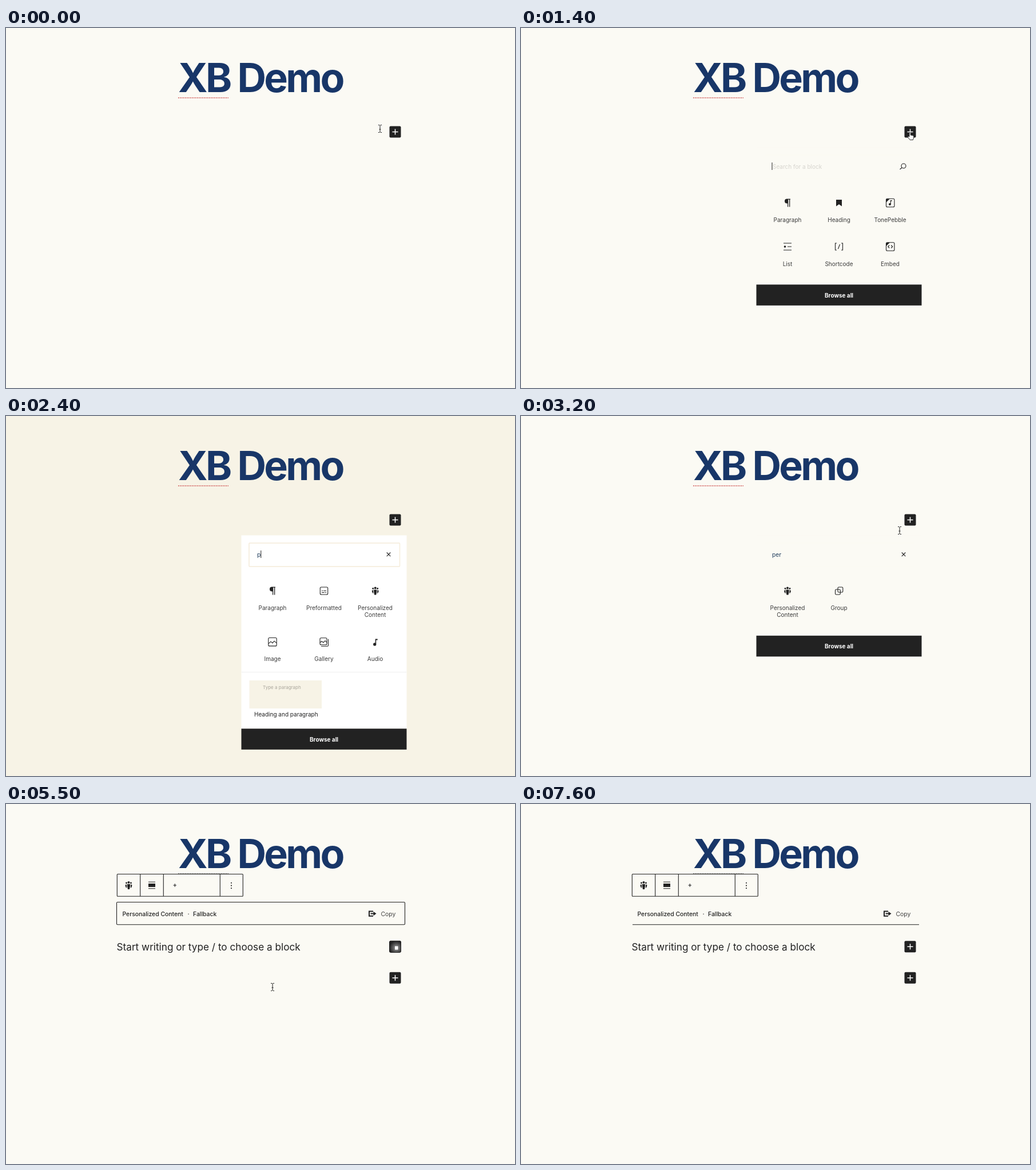
Animation, 890 px wide and 629 px high, one loop 7700 ms. Source, as an HTML page:

```html
<!DOCTYPE html>
<html lang="en">
<head>
<meta charset="utf-8">
<title>Block editor demo</title>
<style>
html, body { margin: 0; width: 100%; height: 100%; overflow: hidden; background: #fbfaf4; }
svg { display: block; width: 890px; height: 629px; background: var(--page);
  --page: #fbfaf4; --panel: #fbfaf4; --edge: #fbfaf4; --rule: #fbfaf4; }
svg.warm { --page: #f7f3e6; --panel: #fff; --edge: #f5ecd9; --rule: #eee; }
text { font: 10px Inter, sans-serif; font-optical-sizing: none; fill: #222; }
.title { font-size: 70px; font-weight: 700; letter-spacing: -.053em; fill: #183668; }
.labels text { text-anchor: middle; fill: #3c3c3c; }
.bar { fill: #222; }
.bar text { font-weight: 700; fill: #fff; text-anchor: middle; }
.query { font-size: 10.3px; fill: #24405f; }
.block { font-size: 10.4px; font-weight: 500; }
.line { fill: none; stroke: #222; stroke-width: 1.1; }
.hover text { fill: #c6c9ef; }
</style>
</head>
<body>
<svg viewBox="0 0 890 629">
  <defs>
    <g id="plus"><rect x="-10" y="-10" width="20" height="20" rx="2" fill="#222"/><path d="M-5 0H5M0-5V5" stroke="#fff" stroke-width="1.5"/></g>
    <path id="paragraph" d="M5-7H-1A4 4 0 0 0-1 1H0V7H1.3V-5.7H3V7H4.3V-5.7H5Z" fill="#222"/>
    <path id="heading" d="M-5-5.5H5V6L0 2.5-5 6Z" fill="#222"/>
    <g id="frame"><rect class="line" x="-7.2" y="-7.2" width="14.4" height="14.4" rx="2"/><path d="M-7-7H-1L-7-1Z" fill="#222"/></g>
    <g id="note"><path d="M0 3V-6H4V-4H1.5V3" fill="#222"/><circle cx="-1" cy="3.4" r="2.6" fill="#222"/></g>
    <g id="music"><use href="#frame"/><use href="#note" transform="scale(.75)"/></g>
    <g id="embed"><use href="#frame"/><path class="line" d="M-1.5-2.5-4 0-1.5 2.5M1.5-2.5 4 0 1.5 2.5"/></g>
    <g id="list"><path class="line" d="M-7-6H7M0 0H7M-7 6H7"/><circle cx="-4.5" r="1.8" fill="#222"/></g>
    <path id="shortcode" class="line" d="M-4-6H-6.5V6H-4M4-6H6.5V6H4M1.5-4-1.5 4"/>
    <g id="preformatted"><rect class="line" x="-6.7" y="-6.5" width="13.4" height="13" rx="2"/><path class="line" d="M-4 0H-2M-1 0H4M-4 3H1M2 3H4"/></g>
    <g id="people" fill="#222"><circle cy="-5" r="2"/><circle cx="-4" cy="-4" r="1.4"/><circle cx="4" cy="-4" r="1.4"/><path d="M-2.5-2H2.5V2L1.5 7H-1.5L-2.5 2ZM-3.5-1.5V5Q-6 3-6-.5ZM3.5-1.5V5Q6 3 6-.5Z"/></g>
    <g id="image"><rect class="line" x="-7.2" y="-7.2" width="14.4" height="14.4" rx="2"/><path class="line" d="M-7 3-3-.5 0 2 3-1.5 7 2"/></g>
    <g id="gallery"><rect class="line" x="-7" y="-7" width="12" height="12" rx="2"/><path class="line" d="M-7 1-4-1-1 1 2-2 5 1M7.5-5V6Q7.5 7.5 6 7.5H-5"/></g>
    <g id="group"><rect class="line" x="-2" y="-6.5" width="8.8" height="9" rx="1.8"/><rect class="line" x="-6.5" y="-2.5" width="8.8" height="9" rx="1.8"/></g>
    <path id="close" class="line" d="M-3.3-3.3 3.3 3.3M3.3-3.3-3.3 3.3"/>
    <path id="beam" d="M-3-6.5H-1L0-5.5 1-6.5H3M0-5.5V5.5M-3 6.5H-1L0 5.5 1 6.5H3M-1.5 1H1.5" fill="none" stroke="#222"/>
    <path id="arrow" d="M0 0V12L3 9.5 5 14 7 13 5 9H9Z" fill="#222" stroke="#fff"/>
    <path id="hand" d="M-2-5Q-.5-6.5.2-4.5V-1L5 0Q6 .5 5.7 2.5L4.5 7.5H-1L-5 2Q-5 0-2 2Z" fill="#fff" stroke="#222" stroke-width=".9"/>
    <radialGradient id="smudge" cx=".6" cy=".6" r=".6"><stop stop-color="#999"/><stop offset="1" stop-color="#222"/></radialGradient>
  </defs>

  <path data-at="3500-5500" d="M195 161.5H695" stroke="#ecf0ec" stroke-width="2"/>
  <text class="title" x="301" y="111.5">XB Demo</text>
  <path data-at="0-5500" d="M301 122H389" stroke="#c44" stroke-width="1.6" stroke-dasharray="1.6 1.4"/>
  <path data-at="5500-7700" d="M301 121.7H389" stroke="#333" stroke-width=".9" stroke-dasharray="1.6 1.4"/>
  <use data-at="0-5500" href="#plus" x="680.5" y="181.5"/>

  <g id="popover" data-at="800-5500">
    <rect id="panel" x="411.5" y="208.5" width="289" fill="var(--panel)"/>
    <rect x="425" y="222" width="263.5" height="41" rx="1" fill="none" stroke="var(--edge)" stroke-width="1.5"/>

    <g data-at="800-2000">
      <text x="440" y="246" style="fill:#d6d4ce">Search for a block</text>
      <path d="M439 235V248" stroke="#222"/>
      <path class="line" d="M666 244 662.5 247" stroke-width="1.6"/><circle class="line" cx="669" cy="241" r="4"/>
      <use href="#paragraph" x="466" y="305.5"/><use href="#heading" x="556" y="305.5"/><use href="#music" x="645.7" y="305.5"/>
      <use href="#list" x="466" y="382"/><use href="#shortcode" x="556" y="382"/><use href="#embed" x="645.7" y="382"/>
      <g class="labels">
        <text x="466" y="338.5">Paragraph</text><text x="556" y="338.5">Heading</text><text x="645.5" y="338.5">TonePebble</text>
        <text x="466" y="415.5">List</text><text x="556" y="415.5">Shortcode</text><text x="645.5" y="415.5">Embed</text>
      </g>
    </g>

    <g data-at="2000-5500">
      <text class="query" id="query" x="439" y="246"></text>
      <use href="#close" x="669" y="241.8"/>
    </g>

    <g data-at="2000-2500">
      <path d="M445.8 235V248" stroke="#222"/>
      <use href="#paragraph" x="466" y="305.5"/><use href="#preformatted" x="556" y="305.5"/><use href="#people" x="645.7" y="305.5"/>
      <use href="#image" x="466" y="394.7"/><use href="#gallery" x="556" y="394.7"/><use href="#note" x="645.7" y="395.5"/>
      <g class="labels">
        <text x="466" y="338.5">Paragraph</text><text x="556" y="338.5">Preformatted</text>
        <text x="645.5" y="338.5">Personalized</text><text x="645.5" y="351">Content</text>
        <text x="466" y="428">Image</text><text x="556" y="428">Gallery</text><text x="645.5" y="428">Audio</text>
      </g>
      <path d="M412 447.5H700" stroke="var(--rule)"/>
      <rect x="425.5" y="462" width="126.5" height="49" fill="#f7f3e6"/>
      <text x="449" y="477" style="font-size:8px;fill:#aaa69c">Type a paragraph</text>
      <text x="434" y="525">Heading and paragraph</text>
    </g>

    <g data-at="2500-5500">
      <rect data-at="4100-5500" x="421.5" y="278.5" width="89.5" height="88.5" fill="none" stroke="var(--edge)" stroke-width="1.3"/>
      <use href="#people" x="466" y="305.5"/><use href="#group" x="556" y="305.5"/>
      <g class="labels">
        <g id="choice"><text x="466" y="338.5">Personalized</text><text x="466" y="351">Content</text></g>
        <text x="556" y="338.5">Group</text>
      </g>
    </g>

    <g class="bar" id="bar"><rect x="411.5" width="289" height="36.5"/><text x="556" y="22.3">Browse all</text></g>
  </g>

  <g data-at="5500-7700">
    <rect class="line" x="194.3" y="122.5" width="220" height="38.7" rx="1"/>
    <path class="line" d="M234.7 122.5V161M275.3 122.5V161M374.3 122.5V161"/>
    <use href="#people" x="214.5" y="142"/>
    <path class="line" d="M249 136.3H261M249 147.8H261"/><rect x="249" y="139" width="12" height="6" fill="#222"/>
    <path class="line" d="M292.5 142H298M295.3 139.2V144.8"/>
    <path d="M394 137V148" stroke="#222" stroke-width="1.8" stroke-dasharray="1.8 2.8"/>
    <rect class="line" data-at="5500-6500" x="193.5" y="171.5" width="504" height="39.2" rx="1.5"/>
    <path class="line" data-at="6500-7700" d="M195 210.7H696"/>
    <g class="block">
      <text class="block" x="203.5" y="195.5">Personalized Content</text>
      <text class="block" x="317.5" y="195.5">·</text>
      <text class="block" x="327" y="195.5">Fallback</text>
    </g>
    <path d="M642 187.5H635V195.8H642M637.5 191.6H643" fill="none" stroke="#222" stroke-width="2"/><path d="M642.5 188 647.5 191.6 642.5 195.3Z" fill="#222"/>
    <text x="655.5" y="195.5" style="font-size:10.4px;fill:#444">Copy</text>
    <text x="193.5" y="256" style="font-size:17.2px">Start writing or type / to choose a block</text>
    <use href="#plus" x="680.5" y="249.3"/>
    <g data-at="5500-6500">
      <rect x="670.5" y="239.3" width="20" height="20" rx="2" fill="url(#smudge)" stroke="#222"/>
      <rect x="680" y="248.5" width="5.5" height="6" fill="#fff"/>
    </g>
    <use href="#plus" x="680.5" y="303.8"/>
  </g>

  <use id="cursor"/>
</svg>
<script>
const LOOP = 7700, STEP = 100;
const svg = document.querySelector('svg');
const byId = id => document.getElementById(id);
const within = (t, from, to) => t >= from && t < to;
const smooth = p => p * p * (3 - 2 * p);

const timed = [...document.querySelectorAll('[data-at]')].map(node => {
  const [from, to] = node.dataset.at.split('-').map(Number);
  return { node, from, to };
});

// Each move: start and end time, start and end point, time at which it gives way.
const moves = [
  { from: 0, to: 200, a: [654, 176], b: [665, 178], until: 500 },
  { from: 500, to: 600, a: [681, 188], b: [681, 188], until: 2000 },
  { from: 3200, to: 3900, a: [662, 200], b: [466, 315], until: 5500 },
  { from: 5400, to: 6000, a: [466, 315], b: [467, 380], until: 6800 },
  { from: 6800, to: 7200, a: [467, 380], b: [469, 607], until: 7300 }
];

function cursorKind(t, x, y) {
  if (within(t, 500, 2000)) return 'hand';
  if (!within(t, 3200, 5500) || y < 209) return 'beam';
  return x < 511 && y > 278 ? 'hand' : 'arrow';
}

function drawCursor(t) {
  const cursor = byId('cursor');
  const move = moves.find(m => t < m.until);
  const visible = move && t >= move.from;
  cursor.style.display = visible ? '' : 'none';
  if (!visible) return;
  const p = smooth(Math.min(1, (t - move.from) / (move.to - move.from)));
  const [x, y] = move.a.map((v, i) => v + (move.b[i] - v) * p);
  cursor.setAttribute('href', '#' + cursorKind(t, x, y));
  cursor.setAttribute('transform', `translate(${x} ${y})`);
}

function draw(t) {
  for (const { node, from, to } of timed) node.style.display = within(t, from, to) ? '' : 'none';
  svg.classList.toggle('warm', within(t, 1600, 3200) || within(t, 4100, 5500));
  byId('popover').style.opacity = Math.max(0, Math.min(1, (t - 700) / 200));
  byId('choice').classList.toggle('hover', t >= 4100);
  byId('query').textContent = t < 2500 ? 'p' : t < 2600 ? 'pe' : 'per';
  const barTop = t < 2000 ? 448.3 : t < 2500 ? 546.3 : 383.8;
  byId('bar').setAttribute('transform', `translate(0 ${barTop})`);
  byId('panel').setAttribute('height', barTop - 208.5);
  drawCursor(t);
}

const start = performance.now();
function tick() {
  const t = (performance.now() - start) % LOOP;
  draw(Math.floor(t / STEP) * STEP);
  requestAnimationFrame(tick);
}
tick();
</script>
</body>
</html>
```
